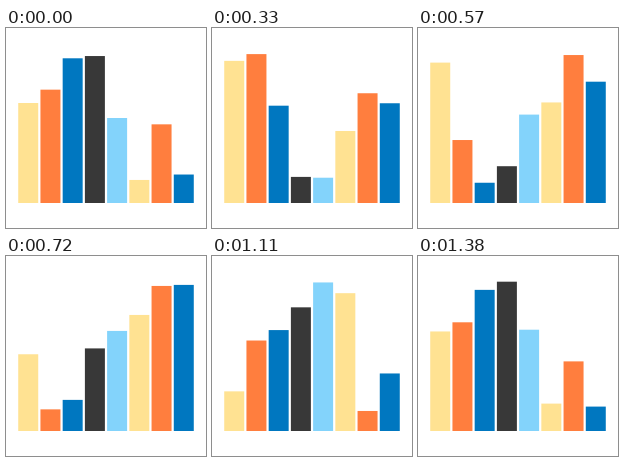
Animation of 200x200 px, one loop 1410 ms. Source, as a matplotlib script:

```python
import numpy as np
import matplotlib.pyplot as plt
from matplotlib.animation import FuncAnimation
from matplotlib.patches import Rectangle

SIZE = 200
FRAMES, INTERVAL = 47, 30
BASE, WIDTH = 175, 20
HEIGHTS = [100, 150, 20, 100]
COLORS = ["#ffe292", "#ff7e3e", "#0077c0", "#383838", "#83d3fb"]
LEADS = [0, 1, 2, 3, 4, 5, 7, 6]  # head start of each bar, in eighths of a loop

# cubic-bezier(.5, 0, .5, 1), sampled once
S = np.linspace(0, 1, 1001)
EASE_X = 1.5 * S * (1 - S) + S**3
EASE_Y = S**2 * (3 - 2 * S)


def height(phase):
    """Bar height at a phase of the loop, in equal eased segments."""
    pos = phase % 1 * (len(HEIGHTS) - 1)
    k = int(pos)
    eased = np.interp(pos - k, EASE_X, EASE_Y)
    return HEIGHTS[k] + (HEIGHTS[k + 1] - HEIGHTS[k]) * eased


fig = plt.figure(figsize=(SIZE / 100, SIZE / 100), dpi=100, facecolor="white")
ax = fig.add_axes([0, 0, 1, 1])
ax.set_xlim(0, SIZE)
ax.set_ylim(SIZE, 0)
ax.axis("off")

pitch = SIZE / (len(LEADS) + 1)
bars = []
for i in range(len(LEADS)):
    bar = Rectangle((pitch * (i + 1) - WIDTH / 2, BASE), WIDTH, 0,
                    color=COLORS[i % len(COLORS)], linewidth=0, snap=False)
    bars.append(ax.add_patch(bar))


def update(frame):
    for bar, lead in zip(bars, LEADS):
        bar.set_height(-height(frame / FRAMES + lead / len(LEADS)))
    return bars


anim = FuncAnimation(fig, update, frames=FRAMES, interval=INTERVAL,
                     repeat=True, repeat_delay=0)
plt.show()
```
